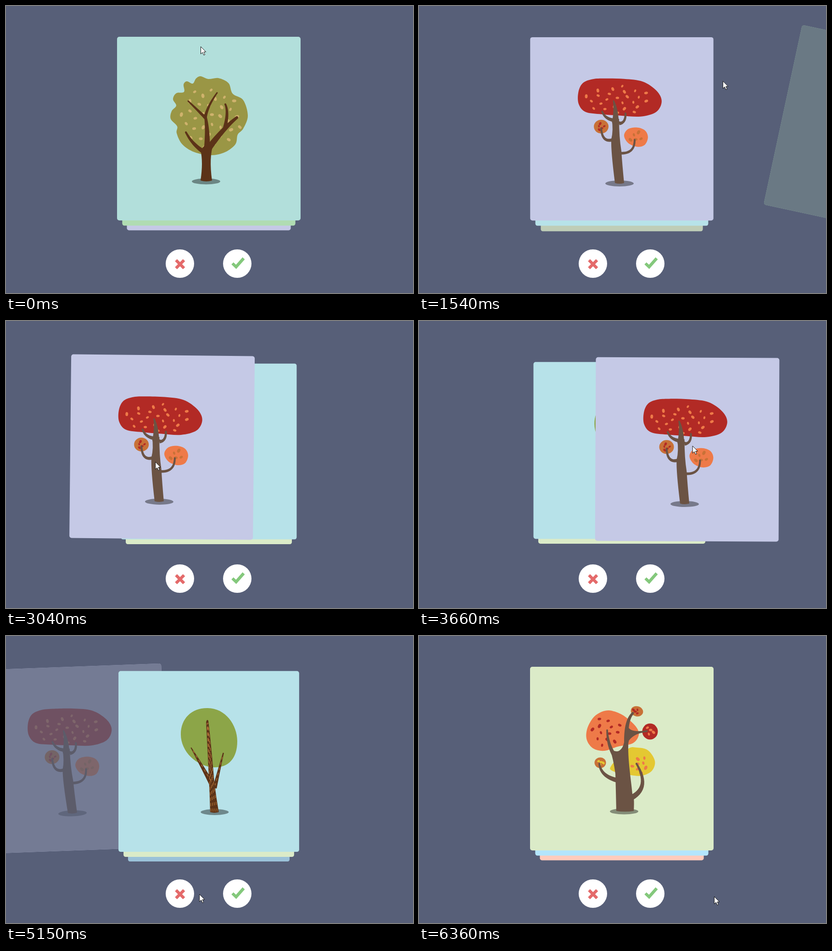
Animation, 887 px wide and 625 px high, one loop 6410 ms. Source, as an HTML page with a canvas:

```html
<!DOCTYPE html>
<html lang="en">
<head>
<meta charset="utf-8">
<title>Card stack</title>
<style>
html, body { margin: 0; width: 100%; height: 100%; overflow: hidden; background: #575f78; }
canvas { display: block; }
</style>
</head>
<body>
<canvas id="stage" width="887" height="625"></canvas>
<script>
const ctx = document.getElementById('stage').getContext('2d');
const LOOP = 6410, FLIGHT = 350, CX = 442, CY = 267, BACK = '#575f78';
const ORANGE = '#ee7a48', RED = '#b22a25', RUST = '#c87137', YELLOW = '#e4c832';
const BARK = '#6b5344', UMBER = '#5c3318';
const mix = (a, b, u) => a + (b - a) * u;

// ---------- shape helpers ----------
function fill(color, path) {
  ctx.fillStyle = color;
  ctx.fill(new Path2D(path));
}

function stroke(color, width, path, dash = []) {
  ctx.strokeStyle = color;
  ctx.lineWidth = width;
  ctx.setLineDash(dash);
  ctx.stroke(new Path2D(path));
}

function oval(color, x, y, rx, ry = rx, angle = 0) {
  ctx.fillStyle = color;
  ctx.beginPath();
  ctx.ellipse(x, y, rx, ry, angle, 0, 7);
  ctx.fill();
}

// Smooth closed curve through a few points
function blob(color, pts) {
  const n = pts.length / 2;
  const at = i => { const k = (i + n) % n * 2; return [pts[k], pts[k + 1]]; };
  ctx.fillStyle = color;
  ctx.beginPath();
  ctx.moveTo(pts[0], pts[1]);
  for (let i = 0; i < n; i++) {
    const [a, b, c, d] = [at(i - 1), at(i), at(i + 1), at(i + 2)];
    ctx.bezierCurveTo(b[0] + (c[0] - a[0]) / 6, b[1] + (c[1] - a[1]) / 6,
      c[0] - (d[0] - b[0]) / 6, c[1] - (d[1] - b[1]) / 6, c[0], c[1]);
  }
  ctx.fill();
}

// Tapered quadratic branch
function limb(color, x0, y0, qx, qy, x1, y1, w0, w1) {
  const left = [], right = [], steps = 14;
  for (let i = 0; i <= steps; i++) {
    const u = i / steps, v = 1 - u;
    const x = v * v * x0 + 2 * u * v * qx + u * u * x1;
    const y = v * v * y0 + 2 * u * v * qy + u * u * y1;
    const dx = v * (qx - x0) + u * (x1 - qx), dy = v * (qy - y0) + u * (y1 - qy);
    const k = mix(w0, w1, u) / 2 / Math.hypot(dx, dy);
    left.push([x - dy * k, y + dx * k]);
    right.unshift([x + dy * k, y - dx * k]);
  }
  ctx.fillStyle = color;
  ctx.beginPath();
  left.concat(right).forEach(p => ctx.lineTo(p[0], p[1]));
  ctx.fill();
  oval(color, x1, y1, w1 / 2);
}

// Seeds spread evenly over an ellipse by the golden angle
function scatter(color, count, x, y, rx, ry, size) {
  for (let i = 0; i < count; i++) {
    const a = i * 2.4 + x, d = Math.sqrt((i + .5) / count);
    const r = size * (.9 + .15 * Math.sin(i * 5));
    oval(color, x + rx * d * Math.cos(a), y + ry * d * Math.sin(a), r, r * .68, i * 1.3);
  }
}

const shadow = (x, y) => oval('rgba(0,0,0,.4)', x, y, 31, 6.5);

// ---------- trees ----------
function oliveTree() {
  shadow(436, 382);
  blob('#9a9645', [424, 153, 441, 159, 463, 157, 485, 168, 494, 191, 517, 205, 527, 239, 517, 267,
    505, 280, 500, 301, 478, 318, 447, 325, 410, 318, 384, 301, 372, 277, 373, 262, 359, 246,
    361, 229, 371, 217, 364, 203, 371, 190, 388, 187, 387, 171, 394, 164, 407, 169, 414, 158]);
  scatter('#cfb26c', 33, 445, 244, 68, 68, 4.8);
  fill(UMBER, 'M424 380Q430 340 424 314L436 300L452 300Q442 330 449 380Q437 384 424 380Z');
  limb(UMBER, 438, 312, 440, 265, 434, 238, 13, 5);
  limb(UMBER, 435, 244, 418, 227, 397, 207, 7, 3);
  limb(UMBER, 434, 244, 438, 220, 460, 189, 7, 3);
  limb(UMBER, 432, 318, 407, 303, 392, 275, 10, 4);
  limb(UMBER, 440, 312, 474, 266, 503, 243, 14, 6);
  limb(UMBER, 476, 268, 486, 232, 478, 214, 8, 4);
}

function leafTree() {
  const red = '#8c0518', tint = '#7d9a68';
  shadow(436, 382);
  fill('#456833', 'M434 153C446 152 467 200 466 242C466 285 453 313 440 322Q434 327 428 322C414 303 401 265 401 232C402 190 422 153 434 153Z');
  stroke(tint, 1.6, 'M445 225V315', [1.6, 4.5]);
  const twigs = [[438, 202, 420, 180], [437, 234, 414, 208], [434, 272, 414, 246], [433, 307, 417, 288],
    [440, 217, 451, 198], [440, 251, 456, 225], [440, 293, 453, 276]];
  for (const [x0, y0, x1, y1] of twigs) {
    const bend = `${mix(x0, x1, .8)} ${mix(y0, y1, .15)}`;
    const twig = `M${x0} ${y0}Q${bend} ${x1} ${y1}`;
    for (const shift of [-5, 5]) {
      ctx.save();
      ctx.translate(x1 < x0 ? shift * .6 : -shift * .6, -shift);
      stroke(tint, 1.6, twig, [1.6, 4.5]);
      ctx.restore();
    }
    limb(red, x0, y0, ...bend.split(' ').map(Number), x1, y1, 5.5, 2.3);
  }
  fill(red, 'M429 382Q431 330 431 305Q432 240 438 189Q440 186 441 190Q440 250 441 305Q442 345 445 380Q437 383 429 382Z');
}

function autumnTree() {
  shadow(437, 386);
  blob(RED, [347, 188, 356, 168, 376, 159, 402, 157, 447, 158, 488, 164, 518, 184, 529, 207,
    517, 230, 483, 240, 440, 238, 398, 235, 363, 230, 348, 213]);
  scatter(ORANGE, 25, 432, 204, 72, 33, 4.2);
  oval(RUST, 397, 262, 16, 15);
  scatter(RED, 5, 397, 263, 10, 8, 3.6);
  blob(ORANGE, [447, 282, 455, 268, 474, 264, 492, 270, 499, 285, 492, 302, 475, 306, 456, 298]);
  scatter(RUST, 5, 473, 286, 16, 13, 4.6);
  fill(BARK, 'M427 385Q418 315 419 290Q424 270 420 245L436 245Q436 285 441 315Q443 345 447 385Q437 388 427 385Z');
  limb(BARK, 428, 254, 430, 225, 424, 206, 15, 3);
  limb(BARK, 424, 248, 405, 245, 399, 229, 8, 3.5);
  fill(BARK, 'M430 236Q433 253 441 251Q448 248 448 232Q450 230 452 233Q454 255 437 259Z');
  limb(BARK, 421, 291, 399, 297, 397, 266, 7, 4);
  limb(BARK, 438, 320, 470, 322, 470, 291, 6, 4);
}

function roundTree() {
  shadow(455, 379);
  fill('#8ca548', 'M438 149C478 148 505 186 505 222C505 260 486 280 455 280C415 279 380 245 380 207C380 172 404 149 438 149Z');
  limb(UMBER, 449, 318, 425, 274, 403, 237, 11, 2);
  limb(UMBER, 455, 326, 464, 288, 474, 249, 9, 2.5);
  fill(UMBER, 'M445 379Q444 340 442 300L436 180Q438 172 441 177C445 210 450 260 454 310Q458 345 464 379Q454 382 445 379Z');
  for (let i = 0; i < 4; i++)
    stroke('#b07238', 1.3, `M${447 + i * 4.5} 378L${443.5 + i * 2.5} 300L${438 + i * .8} 182`, [7, 5 + i]);
  stroke('#b07238', 1.4, 'M407 243L449 314M472 257L456 320', [6, 6]);
}

function fruitTree() {
  shadow(447, 382);
  blob(YELLOW, [475, 243, 499, 249, 514, 272, 508, 293, 487, 304, 462, 303, 422, 294, 420, 281, 455, 246]);
  scatter(ORANGE, 8, 481, 280, 20, 19, 4.8);
  blob(ORANGE, [414, 162, 440, 170, 463, 187, 477, 204, 478, 219, 465, 234, 433, 241, 404, 250,
    380, 245, 366, 227, 366, 204, 378, 180, 394, 167]);
  scatter(RED, 13, 409, 209, 37, 32, 4.6);
  oval(RUST, 475, 164, 13.5, 11, .25);
  scatter(RED, 4, 474, 164, 8, 6, 3.7);
  oval(RED, 503.5, 208, 17, 17.5);
  scatter(ORANGE, 4, 502, 207, 10, 11, 4.2);
  oval(RUST, 395, 276, 12.5, 11.5);
  scatter(YELLOW, 4, 395, 276, 7, 6, 3.7);
  fill(BARK, 'M430 381Q429 335 428 300Q424 270 416 245Q428 254 436 250Q446 244 448 225L457 222C453 260 462 310 465 344Q470 348 468 381Q449 384 430 381Z');
  limb(BARK, 424, 257, 411, 235, 410, 205, 9, 3.5);
  limb(BARK, 452, 232, 450, 184, 466, 168, 10, 5);
  fill(BARK, 'M455 197Q462 212 497 205Q500 207 497 209Q465 212 455 232Z');
  limb(BARK, 431, 314, 396, 305, 393, 278, 10, 4);
  limb(BARK, 463, 352, 505, 330, 474, 278, 12, 4);
}

// ---------- cards ----------
const cards = [
  ['#b2dfdb', oliveTree], ['#b0dcb2', leafTree], ['#c5c9e6', autumnTree],
  ['#b7e2e9', roundTree], ['#dbebc8', fruitTree], ['#b3e5fc'], ['#ffccbc']
];

function drawCard(i, x, y, scale, deg, alpha = 1) {
  const [color, tree] = cards[i];
  ctx.save();
  ctx.translate(x, y);
  ctx.rotate(deg * Math.PI / 180);
  ctx.scale(scale, scale);
  ctx.translate(-CX, -CY);
  ctx.beginPath();
  ctx.roundRect(CX - 200, CY - 200, 400, 400, 5);
  const face = () => { ctx.beginPath(); ctx.roundRect(CX - 200, CY - 200, 400, 400, 5); ctx.fill(); };
  ctx.fillStyle = color;
  face();
  if (tree) tree();
  // Fade the card as a whole by veiling it with the backdrop
  ctx.globalAlpha = 1 - alpha;
  ctx.fillStyle = BACK;
  if (alpha < 1) face();
  ctx.restore();
}

// depth 0 is the front, perspective pulls deeper cards down
function drawStacked(i, depth, alpha) {
  const s = 1000 / (1000 + 60 * depth);
  drawCard(i, CX, CY + 400 * (1 - s), s, 0, alpha);
}

// ---------- motion ----------
const ease = u => mix(u, u * u * (3 - 2 * u), .5);

// Eased steps between rows [time, ...values]
function track(keys, t) {
  const next = keys.findIndex(k => k[0] > t);
  if (next < 1) return (next ? keys[keys.length - 1] : keys[0]).slice(1);
  const [a, b] = [keys[next - 1], keys[next]];
  const u = ease((t - a[0]) / (b[0] - a[0]));
  return a.slice(1).map((v, i) => mix(v, b[i + 1], u));
}

// Drags of the front card: time, x, y, degrees
const still = [[0, 0, 0, 0]];
const drags = [
  [[50, 0, 0, 0], [300, -354, 36, 0]],
  [[1120, 0, 0, 0], [1354, 354, 36, 0]],
  [[2170, 0, 0, 0], [2680, -148, 6.6, .65], [2860, -148, 6.6, .65],
    [3840, 188, 13.5, .19], [4050, 188, 13.5, .19], [4400, 0, 0, 0]],
  still, still
];

// Exits: start, end x, end y, end degrees
const exits = [[300, -600, 5, -15.5], [1354, 600, 5, 15.5], [4981, -403, 0, -2.86], [6000, 403, 0, 2.86]];

const pointer = [
  [50, 424, 88], [300, 70, 124], [700, 403, 82], [1120, 403, 82], [1354, 757, 118],
  [1540, 662, 163], [2100, 438, 278], [2170, 438, 278], [2680, 274, 313], [2860, 274, 313],
  [3840, 646, 265], [4050, 646, 265], [4680, 397, 536], [4860, 393, 562], [5000, 393, 562],
  [5150, 421, 562], [5450, 489, 565], [6010, 489, 565], [6360, 643, 567]
];

const lift = drag => Math.min(1, Math.abs(drag[0]) / 400);

function drawStack(t) {
  const front = exits.filter(e => t >= e[0]).length;
  const exit = exits[front - 1];
  let rest = 0, carried = 0;
  if (exit) {
    rest = (1 - Math.min(1, (t - exit[0]) / FLIGHT)) ** 2;
    const from = track(drags[front - 1], exit[0]);
    carried = lift(from);
    const [x, y, deg] = from.map((a, i) => mix(a, exit[i + 1], 1 - rest));
    if (rest > 0) drawCard(front - 1, CX + x, CY + y, 1, deg, rest);
  }
  const drag = track(drags[front], t), raise = lift(drag);
  const settle = (1 - carried) * rest;
  drawStacked(front + 2, 2 + rest - raise, 1 - rest);
  drawStacked(front + 1, 1 + settle - raise);
  if (settle > 0) drawStacked(front, settle);
  else drawCard(front, CX + drag[0], CY + drag[1], 1, drag[2]);
}

function drawButtons() {
  oval('#fff', 379, 561, 31);
  oval('#fff', 504, 561, 31);
  stroke('#e46a6a', 6.5, 'M370.5 553.5L388 571M388 553.5L370.5 571');
  stroke('#84c87c', 6.5, 'M493.5 560.5L501.5 568L518 549.5');
}

const ARROW = 'M.5 .5V16.5L4.3 13L7 19L9.6 18L7 12H11.8Z';
const HAND = 'M5.5 13V2Q7 -.5 8.5 2V8Q10 6 11.5 8.5Q13 7 14 9.5Q16 8.5 16.5 11V15Q16 18 14.5 21.5H7Q6 18 1 12.5Q1 10 3 10.5Z';

function drawPointer(t) {
  const [x, y] = track(pointer, t);
  const over = bx => Math.hypot(x + 5 - bx, y - 561) < 31;
  const shape = over(379) || over(504) ? HAND : ARROW;
  ctx.save();
  ctx.translate(x, y);
  fill('#fff', shape);
  stroke('#111', 1, shape);
  ctx.restore();
}

function frame() {
  const t = performance.now() % LOOP;
  ctx.fillStyle = BACK;
  ctx.fillRect(0, 0, 887, 625);
  drawStack(t);
  drawButtons();
  drawPointer(t);
  requestAnimationFrame(frame);
}
frame();
</script>
</body>
</html>
```
